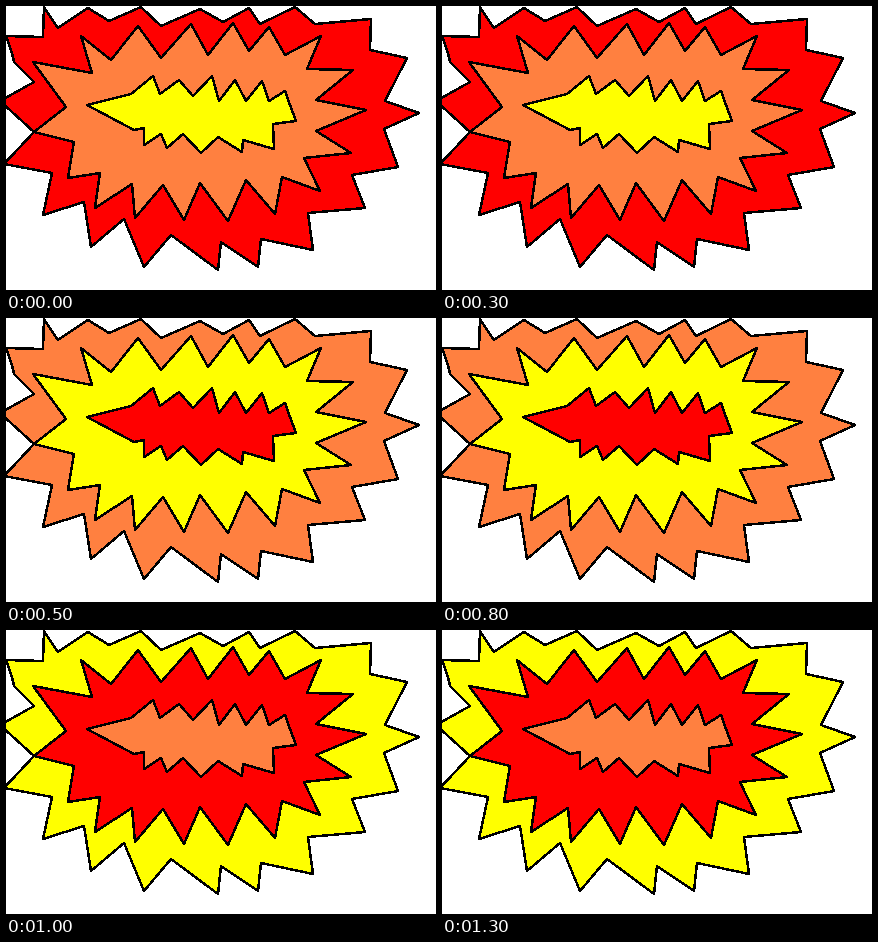
Animation of 430x284 px, one loop 1500 ms. Source, as an HTML page:

```html
<!DOCTYPE html>
<html lang="en">
<head>
<meta charset="utf-8">
<title>Burst</title>
<style>
html, body { margin: 0; width: 100%; height: 100%; overflow: hidden; background: #fff; }
svg { display: block; width: 430px; height: 284px; }
path { stroke: #000; stroke-width: 2.5; stroke-linejoin: round; shape-rendering: crispEdges; }
</style>
</head>
<body>
<svg viewBox="0 0 430 284">
  <path d="M38 1 52 22 82 2 103 15 135 1 155 20 194 3 217 16 243 2 254 18 289 1 309 18 365 13 364 44 401 52 379 95 413 107 378 123 392 161 346 169 359 202 302 207 307 244 255 233 252 261 215 236 212 264 165 229 138 261 118 213 85 241 78 196 37 209 46 167 -2 158 28 126 -6 95 28 76 8 56 6 47 0 30 37 31Z"/>
  <path d="M75 30 105 54 132 20 155 52 185 18 202 49 227 17 243 45 263 21 279 49 315 30 301 63 347 64 310 94 360 104 310 125 345 147 298 152 314 185 276 171 269 208 240 174 222 215 194 177 178 214 157 179 129 212 126 178 89 202 94 167 62 172 68 136 28 126 60 101 27 56 86 67Z"/>
  <path d="M81 99 125 88 147 70 154 88 173 74 187 90 206 70 213 95 229 74 240 95 256 75 263 95 279 85 284 99 290 115 267 118 268 143 237 134 236 146 212 131 195 147 177 128 161 142 155 128 138 139 138 122 128 124Z"/>
</svg>
<script>
const colors = ['#ff0000', '#ff8040', '#ffff00'];
const rings = document.querySelectorAll('path');
const STEP = 500;

// Each step moves every ring on to the next colour.
function draw(ms) {
  const step = Math.floor(ms / STEP) % colors.length;
  rings.forEach((ring, i) => ring.setAttribute('fill', colors[(i + step) % colors.length]));
}

const start = performance.now();
function tick() {
  draw(performance.now() - start);
  requestAnimationFrame(tick);
}
tick();
</script>
</body>
</html>
```
